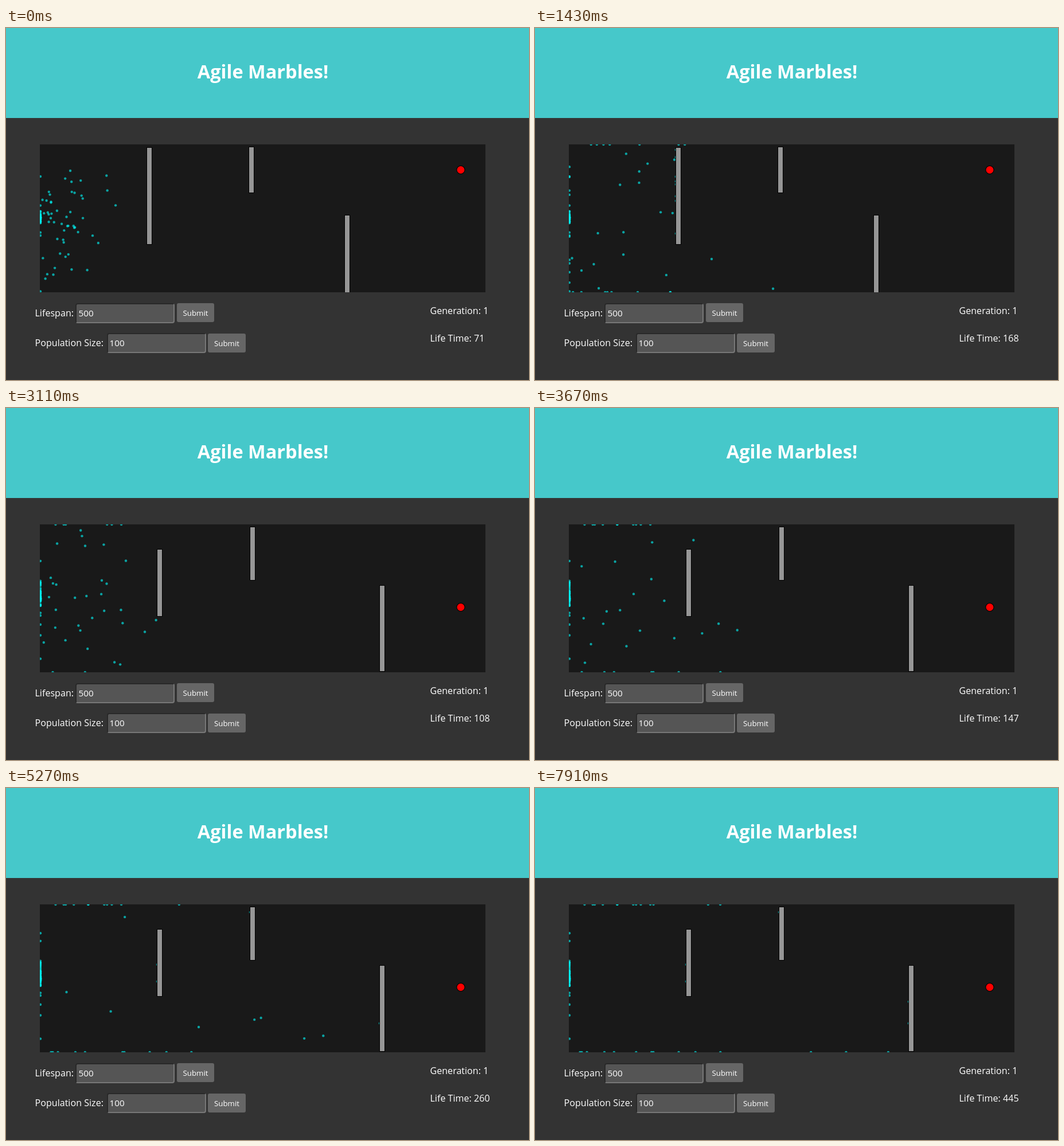
Write an HTML page with a canvas that moves like this. It is 912 px wide and 614 px high and loops after 7.99 s.

```html
<!DOCTYPE html>
<html lang="en">
<head>
<meta charset="utf-8">
<title>Agile Marbles!</title>
<style>
  html, body { margin: 0; width: 100%; height: 100%; overflow: hidden; background: #333; }
  body { position: relative; }
  svg, canvas, .field { position: absolute; box-sizing: border-box; }
  svg { left: 0; top: 0; }
  canvas { left: 59px; top: 203px; }
  text { font: 16.1px "Open Sans", "Noto Sans", sans-serif; fill: #fff; }
  .title { font-size: 32.5px; font-weight: 700; text-anchor: middle; }
  .value { font-size: 15.3px; }
  .button { font-size: 13.3px; text-anchor: middle; }
  .field {
    width: 173px; height: 35px; background: #555; border-radius: 4px;
    border: 2px solid; border-color: #292929 #777 #777 #292929;
  }
</style>
</head>
<body>
<div class="field" style="left:121px; top:480px"></div>
<div class="field" style="left:176px; top:532px"></div>
<svg width="912" height="614">
  <rect width="912" height="157" fill="#46c8ca"/>
  <text class="title" x="448" y="88">Agile Marbles!</text>
  <text x="50.5" y="503">Lifespan:</text>
  <text class="value" x="126.5" y="503">500</text>
  <rect x="298" y="480" width="65" height="33" rx="3" fill="#666"/>
  <text class="button" x="330.5" y="502">Submit</text>
  <text x="50.5" y="555">Population Size:</text>
  <text class="value" x="180.5" y="555">100</text>
  <rect x="352" y="533" width="66" height="33" rx="3" fill="#666"/>
  <text class="button" x="385" y="555">Submit</text>
  <text x="739.5" y="499">Generation: 1</text>
  <text x="739.5" y="547">Life Time: <tspan id="life">71</tspan></text>
</svg>
<canvas id="arena" width="777" height="258"></canvas>
<script>
const LEFT = 60, RIGHT = 835, TOP = 203, BOTTOM = 461;
const START_X = 63.5, START_Y = 332, PILLAR_WIDTH = 8;
const POPULATION = 100, LIFESPAN = 500, THRUST = 0.2;
const LOOP = 7990, CUT = 1590, FRAME = 80;

const lifeLabel = document.getElementById('life');
const ctx = document.getElementById('arena').getContext('2d');
ctx.translate(-59, -203);

// Mulberry32 generator
function seededRandom(seed) {
  return () => {
    seed = (seed + 0x6D2B79F5) | 0;
    let n = Math.imul(seed ^ (seed >>> 15), 1 | seed);
    n = (n + Math.imul(n ^ (n >>> 7), 61 | n)) ^ n;
    return ((n ^ (n >>> 14)) >>> 0) / 2 ** 32;
  };
}

const clamp = (value, low, high) => Math.min(high, Math.max(low, value));

// A bubble is pushed in a random direction at each step and sticks to whatever it hits.
function flyBubble(random, pillars) {
  const path = [[START_X, START_Y]];
  let x = START_X, y = START_Y, vx = 0, vy = 0, stuck = false;
  while (path.length < LIFESPAN) {
    const angle = random() * 2 * Math.PI;
    if (!stuck) {
      vx += THRUST * Math.cos(angle);
      vy += THRUST * Math.sin(angle);
      x = clamp(x + vx, LEFT, RIGHT);
      y = clamp(y + vy, TOP, BOTTOM);
      const pillar = pillars.find(p =>
        x > p.x && x < p.x + PILLAR_WIDTH && y > p.y && y < p.y + p.height);
      if (pillar) x = vx > 0 ? pillar.x : pillar.x + PILLAR_WIDTH;
      stuck = pillar || x === LEFT || x === RIGHT || y === TOP || y === BOTTOM;
    }
    path.push([x, y]);
  }
  return path;
}

function makeScene(seed, targetY, pillars) {
  const random = seededRandom(seed);
  const paths = Array.from({ length: POPULATION }, () => flyBubble(random, pillars));
  return { paths, pillars, targetY };
}

const firstScene = makeScene(11, 247, [
  { x: 246, y: 209, height: 168 },
  { x: 424, y: 208, height: 79 },
  { x: 591, y: 327, height: 134 }
]);
const secondScene = makeScene(29, 347, [
  { x: 264, y: 247, height: 116 },
  { x: 426, y: 208, height: 92 },
  { x: 652, y: 310, height: 149 }
]);

function disc(x, y, radius, color) {
  ctx.fillStyle = color;
  ctx.beginPath();
  ctx.arc(x, y, radius, 0, 2 * Math.PI);
  ctx.fill();
}

function draw({ paths, pillars, targetY }, life) {
  ctx.fillStyle = '#191919';
  ctx.fillRect(59, 203, 777, 258);
  for (const path of paths) disc(...path[life], 2.2, 'rgba(0, 255, 255, 0.6)');
  for (const { x, y, height } of pillars) {
    ctx.fillStyle = '#000';
    ctx.fillRect(x - 1, y - 1, PILLAR_WIDTH + 2, height + 2);
    ctx.fillStyle = '#969696';
    ctx.fillRect(x, y, PILLAR_WIDTH, height);
  }
  disc(793, targetY + 0.5, 7.5, '#000');
  disc(793, targetY + 0.5, 6.5, '#f00');
  lifeLabel.textContent = life;
}

function tick() {
  const t = performance.now() % LOOP;
  if (t < CUT) {
    const step = Math.min(18, Math.floor((t + 10) / FRAME));
    draw(firstScene, Math.floor(71 + step * 5.4));
  } else {
    const step = Math.floor((t - CUT) / FRAME);
    draw(secondScene, Math.floor(2.1 + step * 5.61));
  }
  requestAnimationFrame(tick);
}
tick();
</script>
</body>
</html>
```
